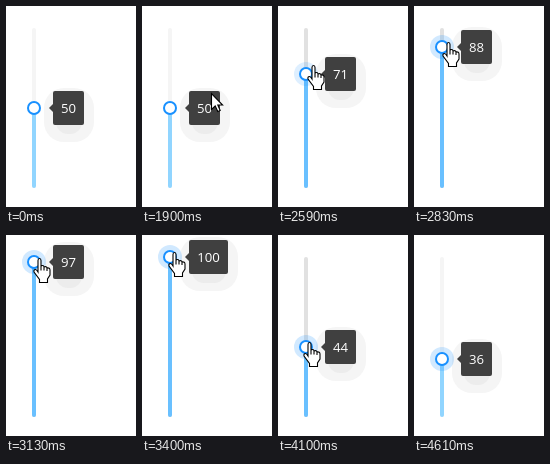
These frames come from a looping animation (130x201 px, 6.11 s). An HTML page with a canvas:

```html
<!DOCTYPE html>
<html lang="en">
<head>
<meta charset="utf-8">
<title>Vertical slider</title>
<style>
html, body { margin: 0; width: 100%; height: 100%; overflow: hidden; background: #fff; }
canvas { display: block; }
</style>
</head>
<body>
<canvas id="stage" width="130" height="201"></canvas>
<script>
const ctx = document.getElementById('stage').getContext('2d');
const LOOP = 6110, TOP = 22, BOTTOM = 182, X = 28;

// time, value, hover, focus, cursor, cursor x, cursor y
const poses = [
  [0, 50, 0, 0],
  [1900, 50, 0, 0, 'arrow', 69, 87],
  [2050, 50, 0, 0, 'arrow', 43, 91],
  [2200, 50, .5, 0, 'hand', 33, 94],
  [2320, 50, 1, 0, 'hand', 29, 95],
  [2470, 57, 1, .4, 'hand', 29, 82],
  [2590, 71, 1, .7, 'hand', 29, 59],
  [2710, 82, 1, 1, 'hand', 28, 43],
  [2830, 88, 1, 1, 'hand', 28, 36],
  [2980, 92, 1, 1, 'hand', 28, 30],
  [3130, 97, 1, 1, 'hand', 27, 23],
  [3250, 99, 1, 1, 'hand', 27, 19],
  [3400, 100, 1, 1, 'hand', 26, 17],
  [3680, 100, 1, 1, 'hand', 26, 18],
  [3830, 82, 1, 1, 'hand', 26, 48],
  [3950, 56, 1, 1, 'hand', 25, 88],
  [4100, 44, 1, 1, 'hand', 25, 107],
  [4220, 38, 1, 1, 'hand', 25, 117],
  [4340, 36, 1, 1, 'hand', 25, 120],
  [4490, 36, .5, 1],
  [4610, 36, 0, 1]
];

const cursors = {
  arrow: new Path2D('M.5 .5V16.5L4.2 13L6.8 18.5L9.2 17.5L6.8 12H11.6Z'),
  hand: new Path2D('M5 14V2.5Q5 .5 6.5 .5Q8 .5 8 2.5V8Q10.5 6.5 11 9Q13.5 8 14 10Q17 9.5 17 12V17L14.5 21V24.5H6.5V21.5L1 14Q.5 11.5 2.5 11.5Q3.5 11.5 5 14ZM8 8V12.5M11 9V12.5M14 10V13')
};

const mix = (a, b, k) => `rgb(${a.map((c, i) => Math.round(c + (b[i] - c) * k))})`;

function box(x, y, w, h, r, color) {
  ctx.fillStyle = color;
  ctx.beginPath();
  ctx.roundRect(x, y, w, h, r);
  ctx.fill();
}

function drawSlider(y, hover, focus) {
  box(X - 2, TOP, 4, BOTTOM - TOP, 2, mix([245, 245, 245], [225, 225, 225], hover));
  box(X - 2, y, 4, BOTTOM - y, 2, mix([145, 213, 255], [105, 192, 255], hover));
  box(X - 12, y - 12, 24, 24, 12, `rgba(24,144,255,${.2 * focus})`);
  box(X - 7, y - 7, 14, 14, 7, '#1890ff');
  box(X - 5, y - 5, 10, 10, 5, '#fff');
}

function drawTooltip(y, value, width) {
  box(47, y - 17, width, 34, 2, '#404040');
  ctx.beginPath();
  ctx.moveTo(43, y);
  ctx.lineTo(47, y - 4);
  ctx.lineTo(47, y + 4);
  ctx.fill();
  ctx.fillStyle = '#fff';
  ctx.font = '13.2px "Open Sans", "Noto Sans", sans-serif';
  ctx.textAlign = 'center';
  ctx.fillText(value, 47 + width / 2, y + 5);
}

function drawCursor(kind, x, y) {
  ctx.save();
  ctx.translate(x, y);
  ctx.fillStyle = '#fff';
  ctx.strokeStyle = '#000';
  ctx.lineWidth = 1.1;
  ctx.fill(cursors[kind]);
  ctx.stroke(cursors[kind]);
  ctx.restore();
}

function draw(now) {
  const time = now % LOOP;
  const [, value, hover, focus, kind, cx, cy] = poses.findLast(p => p[0] <= time);
  const y = Math.round(BOTTOM - (BOTTOM - TOP) * value / 100);
  const width = value > 99 ? 39 : 31;
  ctx.fillStyle = '#fff';
  ctx.fillRect(0, 0, 130, 201);
  // soft shadow in two bands
  box(38, y - 20, width + 19, 54, 20, '#f5f5f5');
  box(50, y, width - 5, 26, 12, '#ececec');
  drawSlider(y, hover, focus);
  drawTooltip(y, value, width);
  if (kind) drawCursor(kind, cx, cy);
}

function tick() {
  draw(performance.now());
  requestAnimationFrame(tick);
}
tick();
</script>
</body>
</html>
```
